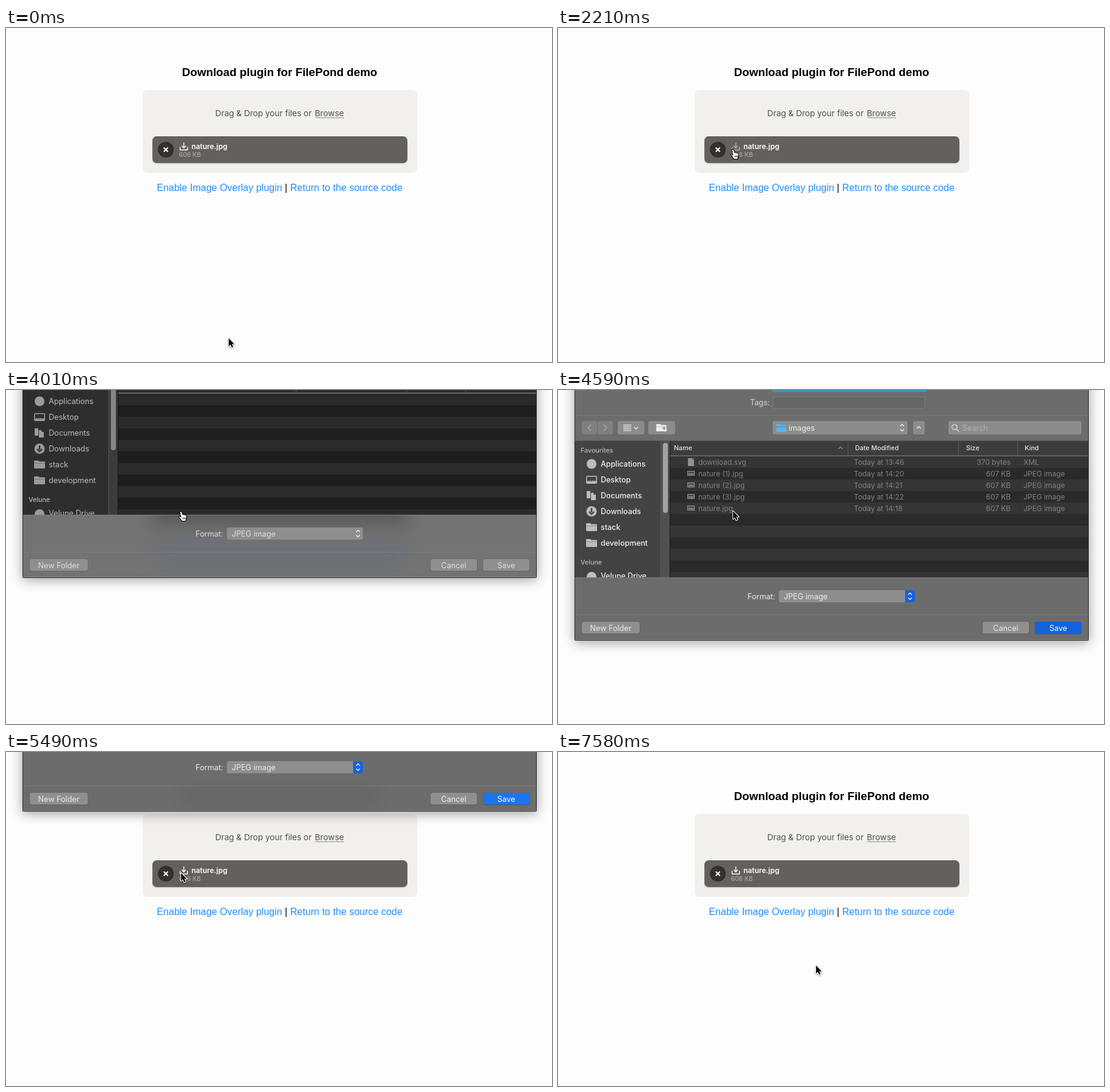
An HTML page with a canvas that plays this animation: 895 by 549 pixels, repeating every 8000 ms.

```html
<!DOCTYPE html>
<html lang="en">
<head>
<meta charset="utf-8">
<title>Download plugin demo</title>
<style>
  html, body { margin: 0; width: 100%; height: 100%; overflow: hidden; background: #fdfdfd; }
  canvas { display: block; width: 895px; height: 549px; }
</style>
</head>
<body>
<canvas id="stage" width="895" height="549"></canvas>
<script>
const ctx = document.getElementById('stage').getContext('2d');
const W = 895, H = 549, LOOP = 8000;
const SANS = '"Liberation Sans", Arial, sans-serif';
const UI = 'Inter, "Open Sans", sans-serif';

// ---------- helpers ----------
function rect(x, y, w, h, color) {
  ctx.fillStyle = color;
  ctx.fillRect(x, y, w, h);
}
function round(x, y, w, h, r, color) {
  ctx.fillStyle = color;
  ctx.beginPath();
  ctx.roundRect(x, y, w, h, r);
  ctx.fill();
}
function disc(x, y, r, color) {
  ctx.fillStyle = color;
  ctx.beginPath();
  ctx.arc(x, y, r, 0, Math.PI * 2);
  ctx.fill();
}
function line(color, width, ...points) {
  ctx.strokeStyle = color;
  ctx.lineWidth = width;
  ctx.beginPath();
  points.forEach(([x, y], i) => i ? ctx.lineTo(x, y) : ctx.moveTo(x, y));
  ctx.stroke();
}
function text(str, x, y, font, color, align = 'left') {
  ctx.font = font;
  ctx.fillStyle = color;
  ctx.textAlign = align;
  ctx.fillText(str, x, y);
}
function shadow(color, blur, dy) {
  ctx.shadowColor = color;
  ctx.shadowBlur = blur;
  ctx.shadowOffsetY = dy;
}
function scoped(draw) {
  ctx.save();
  draw();
  ctx.restore();
}
const chevron = (x, y, w, h, color, width = 1.4) =>
  line(color, width, [x - w, y - h], [x, y], [x + w, y - h]);

// Share of n evenly timed steps already taken at time t.
function steps(t, start, end, n) {
  if (t < start) return 0;
  if (n === 1) return 1;
  const gap = (end - start) / (n - 1);
  return Math.min(n, Math.floor((t - start) / gap + 0.03) + 1) / n;
}
const between = (t, a, b) => t >= a && t < b;
const latest = (keys, t) => keys.filter(key => key[0] <= t).pop();

// ---------- timeline ----------
const smooth = p => p * p * (3 - 2 * p);
const easeOut = p => 1 - (1 - p) ** 3;
const LEGS = [
  { start: 140, end: 140, n: 1, to: [345, 446], ease: smooth },
  { start: 440, end: 1470, n: 8, to: [292, 224], ease: smooth },
  { start: 1610, end: 2210, n: 5, to: [287, 199], ease: easeOut },
  { start: 6830, end: 7580, n: 6, to: [423, 351], ease: smooth }
];
const SHEET = [[0, null], [3860, -365], [4010, -103], [4150, 0], [5340, -45], [5490, -314], [5640, null]];
const BUBBLE = [[0, 0, 0], [6080, 466, 0.55], [6230, 492, 1], [6380, 495, 0.5], [6530, 0, 0]];

function cursorAt(t) {
  let [x, y] = [365, 510];
  for (const leg of LEGS) {
    const p = leg.ease(steps(t, leg.start, leg.end, leg.n));
    x += (leg.to[0] - x) * p;
    y += (leg.to[1] - y) * p;
  }
  return [x, y];
}
function iconAlpha(t) {
  if (t < 4300) return 1 - 0.5 * steps(t, 1760, 2060, 3);
  if (t < 6830) return 1 - 0.5 * steps(t, 5930, 6080, 2);
  return 0.5 + 0.5 * steps(t, 6980, 7130, 2);
}
const isHand = t => between(t, 1760, 4300) || between(t, 5930, 6980);

// ---------- page ----------
function drawPage(t) {
  rect(0, 0, W, H, '#fdfdfd');
  text('Download plugin for FilePond demo', 448.5, 79, `bold 18.72px ${SANS}`, '#000', 'center');

  round(224, 102, 450, 136, 8, '#f1f0ef');
  const dropFont = `13.55px ${UI}`;
  text('Drag & Drop your files or ', 343, 145, dropFont, '#4f4f4f');
  text('Browse', 554, 145, dropFont, '#4f4f4f', 'right');
  rect(507, 147, 47, 1, '#8d8d8d');

  scoped(() => {
    shadow('rgba(0,0,0,.2)', 2, 1);
    round(240, 178, 418, 44, 7, '#64605e');
  });
  disc(262, 200, 13, '#32302f');
  line('#fff', 2, [258.5, 196.5], [265.5, 203.5]);
  line('#fff', 2, [265.5, 196.5], [258.5, 203.5]);

  scoped(() => {
    ctx.globalAlpha = iconAlpha(t);
    ctx.lineCap = ctx.lineJoin = 'round';
    line('#fff', 1.4, [285.5, 196], [285.5, 200.5], [297.5, 200.5], [297.5, 196]);
    line('#fff', 1.4, [291.5, 188.8], [291.5, 197]);
    chevron(291.5, 197, 3, 3, '#fff');
  });
  text('nature.jpg', 304, 199, `600 11.9px ${UI}`, '#fff');
  text('606 KB', 283.5, 212, `500 10.2px ${UI}`, '#aaa8a7');

  const linkFont = `16px ${SANS}`;
  text('Enable Image Overlay plugin', 247.2, 268, linkFont, '#1e90ff');
  text('|', 457, 268, linkFont, '#000');
  text('Return to the source code', 649.8, 268, linkFont, '#1e90ff', 'right');
}

// ---------- save sheet ----------
const uiFont = `12.6px ${UI}`;
const listFont = `11.9px ${UI}`;
const headFont = `500 10.7px ${UI}`;
const FILES = [
  ['download.svg', '13:46', '370 bytes', 'XML'],
  ['nature (1).jpg', '14:20', '607 KB', 'JPEG image'],
  ['nature (2).jpg', '14:21', '607 KB', 'JPEG image'],
  ['nature (3).jpg', '14:22', '607 KB', 'JPEG image'],
  ['nature.jpg', '14:18', '607 KB', 'JPEG image']
];

function button(label, x, y, w, color, ink) {
  scoped(() => {
    shadow('rgba(0,0,0,.35)', 1.5, 0.5);
    round(x, y, w, 19.5, 3.5, color);
  });
  text(label, x + w / 2, y + 14.5, uiFont, ink, 'center');
}
function updown(x, y) {
  chevron(x, y + 5.5, 3, 3, '#f0f0f0');
  chevron(x, y - 5.5, 3, -3, '#f0f0f0');
}
function folder(x, y, w, h, color) {
  round(x, y, w * 0.45, 4, 1, color);
  round(x, y + 1.5, w, h - 1.5, 1.2, color);
  rect(x, y + 4, w, 0.8, 'rgba(0,0,0,.3)');
}

function drawToolbar() {
  round(350, -20, 254, 23.5, 3, '#3f93c4');
  text('Tags:', 347, 25, uiFont, '#d6d6d6', 'right');
  rect(352, 11, 250, 20, '#7b7b7b');
  rect(353, 12, 248, 18, '#666');
  rect(28, 41, 841, 1, '#7a7a7a');

  for (const [x, w] of [[39, 25], [65, 25], [98, 43.5], [148, 44], [352, 221], [582, 19], [640, 218]])
    round(x, 51, w, 22, 3.5, x < 90 ? '#808080' : '#8c8c8c');
  line('#a9a9a9', 1.5, [54, 57], [49, 62], [54, 67]);
  line('#a9a9a9', 1.5, [75, 57], [80, 62], [75, 67]);
  for (let i = 0; i < 4; i++) rect(107, 57 + i * 3, 13, 1.2, '#f0f0f0');
  chevron(128, 64, 3, 3, '#f0f0f0');
  folder(161, 56, 17, 12, '#f0f0f0');
  line('#777', 1.2, [174, 60], [174, 66]);
  line('#777', 1.2, [171, 63], [177, 63]);
  folder(358, 56, 16, 13, '#5ab7e6');
  text('images', 378, 67, uiFont, '#f0f0f0');
  updown(564, 62);
  chevron(591.5, 60, 3, -3, '#f0f0f0');

  ctx.strokeStyle = '#dedede';
  ctx.lineWidth = 1.3;
  ctx.beginPath();
  ctx.arc(650, 61, 4.2, 0, Math.PI * 2);
  ctx.stroke();
  line('#dedede', 1.4, [653, 64], [657, 68]);
  text('Search', 663, 67, uiFont, '#b0b0b0');
}

function drawSidebar(active) {
  const ink = active ? '#efefef' : '#bcbcbc';
  const icon = active ? '#bdbdbd' : '#9b9b9b';
  const hole = active ? '#434343' : '#2e2e2e';
  const itemFont = active ? `500 12.4px ${UI}` : uiFont;
  rect(28, 84, 141, 224, hole);
  rect(168, 84, 16, 224, active ? '#505050' : '#3b3b3b');
  rect(168, 84, 1, 224, '#5a5a5a');
  round(172, 87, 8, 115, 4, active ? '#a2a2a2' : '#868686');
  text('Favourites', 37, 103, headFont, '#b8b8b8');
  text('Velune', 37, 287, headFont, '#b8b8b8');

  const items = ['Applications', 'Desktop', 'Documents', 'Downloads', 'stack', 'development'];
  items.forEach((label, i) => text(label, 70, 126 + i * 26, itemFont, ink));
  text('Velune Drive', 70, 310, itemFont, ink);

  disc(55, 121.5, 8, icon);
  round(46, 141, 18, 13, 2, icon);
  rect(47.5, 142.5, 15, 8, hole);
  for (let i = 0; i < 4; i++) rect(49 + i * 3.5, 149, 2, 2, icon);
  rect(47, 166, 6, 12, icon);
  rect(53, 168, 9, 13, hole);
  rect(54, 169, 8, 12, icon);
  rect(58.5, 168, 4, 4, hole);
  disc(55, 199.5, 8.5, icon);
  line(hole, 2.4, [55, 194], [55, 201]);
  chevron(55, 204, 4, 4, hole, 2.4);
  folder(46, 219, 18, 13, icon);
  folder(46, 245, 18, 13, icon);
  disc(55, 307, 8, icon);
}

function drawTable(active, loaded) {
  const [odd, even] = active ? ['#353535', '#2a2a2a'] : ['#2a2a2a', '#1e1e1e'];
  rect(184, 84, 685, 24, active ? '#3c3c3c' : '#2c2c2c');
  for (let i = 0; i < 11; i++) rect(184, 109 + i * 19, 685, 19, i % 2 ? even : odd);
  rect(184, 107, 685, 1, '#565656');
  for (const x of [475, 656, 753]) rect(x, 84, 1, 23, '#5a5a5a');
  const ink = active ? '#e6e6e6' : '#a8a8a8';
  [['Name', 190], ['Date Modified', 487], ['Size', 669], ['Kind', 765]]
    .forEach(([label, x]) => text(label, x, 99, headFont, ink));
  chevron(463, 93.5, 3.5, -3.5, '#9a9a9a', 1.1);
  if (!loaded) return;

  FILES.forEach(([name, time, size, kind], i) => {
    const y = 123 + i * 19, gray = '#828282';
    if (i) {
      rect(212, y - 9, 12, 8, '#9a9a9a');
      rect(213, y - 8, 10, 6, '#4d4d4d');
      rect(214, y - 5, 8, 2, '#858a7a');
    } else {
      rect(213, y - 11, 10, 13, '#929292');
      rect(220, y - 11, 3, 3, '#606060');
    }
    text(name, 230, y, listFont, gray);
    text('Today at ' + time, 485, y, listFont, gray);
    text(size, 742, y, listFont, gray, 'right');
    text(kind, 763, y, listFont, gray);
  });
}

// Soft tints of the page showing through the sheet.
function drawBackdrop(offset) {
  const tint = (x, y, w, h, color) => rect(x, y - offset, w, h, color);
  ctx.filter = 'blur(14px)';
  tint(289, 62, 319, 20, 'rgba(0,0,0,.08)');
  if (offset > -250) {
    tint(240, 176, 418, 46, 'rgba(0,0,0,.22)');
    tint(250, 252, 400, 34, 'rgba(70,100,140,.2)');
  }
  ctx.filter = 'none';
}

function drawSheet(t) {
  const offset = latest(SHEET, t)[1];
  if (offset === null) return;
  const active = t >= 4300, loaded = t >= 4450;
  scoped(() => {
    ctx.translate(0, offset);
    scoped(() => {
      shadow('rgba(0,0,0,.38)', 20, 3);
      round(27, -60, 843, 472, 2, '#2b2b2b');
    });
    rect(28, -60, 841, 471, active ? '#6c6c6c' : '#737373');
    if (offset) scoped(() => {
      ctx.beginPath();
      ctx.rect(28, -60, 841, 471);
      ctx.clip();
      drawBackdrop(offset);
    });

    drawToolbar();
    scoped(() => {
      ctx.beginPath();
      ctx.rect(28, 84, 841, 224);
      ctx.clip();
      drawSidebar(active);
      drawTable(active, loaded);
      rect(183, 84, 1, 224, '#151515');
    });
    rect(28, 83, 841, 1, '#555');
    rect(28, 308, 841, 1, '#7c7c7c');
    rect(28, 369, 841, 1, '#7c7c7c');
    rect(28, 410, 841, 1, '#8a8a8a');

    const ink = active ? '#ececec' : '#dedede';
    text('Format:', 356, 344, uiFont, ink, 'right');
    round(362, 329, 223, 20, 3.5, '#8e8e8e');
    if (active) round(569, 329, 16, 20, [0, 3.5, 3.5, 0], '#1763d8');
    updown(577, 339);
    text('JPEG image', 370, 344, uiFont, ink);

    const blue = t >= 5340 ? '#1e74ea' : '#1262de';
    button('New Folder', 39, 381, 95, '#8f8f8f', ink);
    button('Cancel', 696, 381, 76, '#8f8f8f', ink);
    button('Save', 782, 381, 76, active ? blue : '#8f8f8f', active ? '#fff' : ink);
  });
}

// ---------- download bubble ----------
function drawBubble(t) {
  const [, y, alpha] = latest(BUBBLE, t);
  if (!alpha) return;
  scoped(() => {
    ctx.globalAlpha = alpha;
    ctx.translate(33.5, y);
    scoped(() => {
      shadow('rgba(0,0,0,.3)', 9, 3);
      disc(0, 0, 37, '#4a4a4a');
    });
    disc(0, 0, 36, '#fafafb');
    const blue = '#5a94f6';
    rect(-4.5, -14, 9, 11, blue);
    ctx.beginPath();
    ctx.moveTo(-10, -4);
    ctx.lineTo(10, -4);
    ctx.lineTo(0, 6.5);
    ctx.fill();
    rect(-15.5, 20, 32, 4, blue);
  });
}

// ---------- pointer ----------
const ARROW = new Path2D('M0 0V13L3 10.3L5.1 15L7.4 14L5.3 9.4H9.3Z');
const HAND = new Path2D('M-2 1Q-2 -1 0 -.5Q1 -.3 1.6 1.5L3 5Q5 3.8 5.4 5.2Q7 4.4 7.5 5.8Q9 5.5 9 7.5V10Q9 12 8 14V15.5H1Q0 13 -2 11Q-4.5 8.5 -3.5 7.6Q-2 7 -.3 9Z');

function drawCursor(t) {
  const [x, y] = cursorAt(t);
  scoped(() => {
    ctx.translate(Math.round(x), Math.round(y));
    ctx.lineJoin = 'round';
    if (isHand(t)) {
      ctx.translate(0, 1);
      ctx.fillStyle = '#fff';
      ctx.strokeStyle = '#000';
      ctx.lineWidth = 1.1;
      ctx.fill(HAND);
      ctx.stroke(HAND);
      for (const fx of [3.2, 5.2, 7.2]) line('#000', 0.9, [fx, 9.5], [fx, 12.5]);
      return;
    }
    ctx.strokeStyle = '#fff';
    ctx.lineWidth = 2;
    scoped(() => {
      shadow('rgba(0,0,0,.45)', 3, 1);
      ctx.stroke(ARROW);
    });
    ctx.fillStyle = '#000';
    ctx.fill(ARROW);
  });
}

const origin = performance.now();
function frame() {
  const t = (performance.now() - origin) % LOOP;
  drawPage(t);
  drawSheet(t);
  drawBubble(t);
  drawCursor(t);
  requestAnimationFrame(frame);
}
frame();
</script>
</body>
</html>
```
